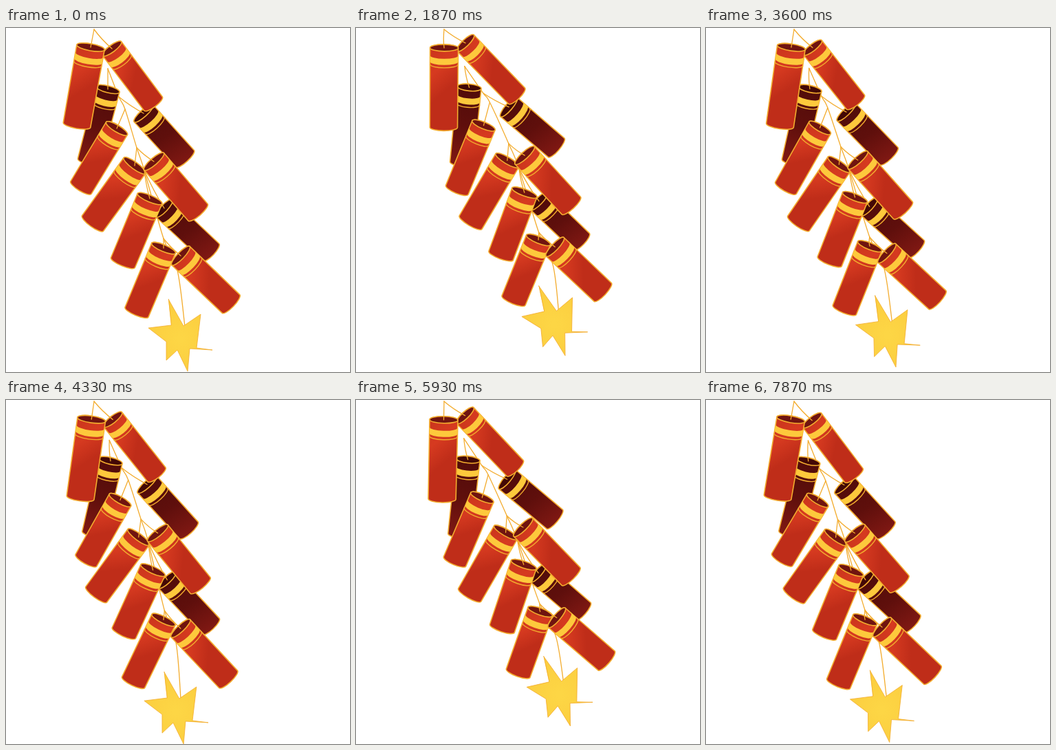
Animation, 500 px wide and 500 px high, one loop 7940 ms. Source, as an HTML page with a canvas:

```html
<!DOCTYPE html>
<html lang="en">
<head>
<meta charset="utf-8">
<title>Firecrackers</title>
<style>
  html, body { margin: 0; width: 100%; height: 100%; overflow: hidden; background: #fff; }
  canvas { display: block; width: 500px; height: 500px; }
</style>
</head>
<body>
<canvas id="stage"></canvas>
<script>
const canvas = document.getElementById('stage');
const ctx = canvas.getContext('2d');
const ratio = window.devicePixelRatio || 1;
canvas.width = canvas.height = 500 * ratio;

const GOLD = '#f3ac2e', BAND = '#fdc93c';
const LOOP = 7940, CYCLE = 57;

// Swing keys: [step, amount of right swing, amount of left swing]
const KEYS = [
  [0, 0, 0], [14, 0, 1], [23, 0.3, 1], [37, 1, 0],
  [40, 0.93, -0.19], [51, 0.13, 0.165], [55, 0.03, 0.04]
];

// Every place is given in three poses: rest, left swing, right swing
const NODES = [
  [[128, 2], [128, 2], [128, 2]],
  [[148, 59], [161, 55], [145, 59]],
  [[164, 100], [190, 93], [160, 101]],
  [[173, 118], [201, 107], [167, 117]],
  [[190, 174], [228, 168], [188, 172]],
  [[201, 207], [240, 205], [206, 205]],
  [[229, 306], [249, 302], [271, 294]],
  [[249, 352], [256, 355], [317, 332]],
  [[260, 434], [249, 433], [356, 395]]
];

// Back to front; each pose holds the top and bottom centres
const BARRELS = [
  { node: 1, w: 17.5, dark: true, poses: [[148, 89, 121, 194], [171, 86, 161, 197], [141, 89, 117, 193]] },
  { node: 2, w: 18.5, dark: true, poses: [[200, 124, 260, 190], [230, 115, 296, 181], [192, 121, 260, 172]] },
  { node: 5, w: 17.5, dark: true, poses: [[230, 262, 298, 326], [262, 256, 308, 333], [248, 251, 343, 280]] },
  { node: 0, w: 17, poses: [[154, 30, 214, 110], [161, 20, 242, 99], [152, 31, 204, 106]] },
  { node: 0, w: 20.5, poses: [[123, 28, 103, 141], [130, 29, 134, 146], [121, 28, 98, 139]] },
  { node: 3, w: 18, poses: [[161, 146, 109, 232], [191, 142, 155, 238], [158, 144, 105, 228]] },
  { node: 4, w: 19.5, poses: [[187, 200, 126, 284], [224, 194, 164, 278], [189, 195, 143, 292]] },
  { node: 4, w: 19, poses: [[215, 194, 279, 268], [250, 188, 307, 270], [215, 186, 300, 243]] },
  { node: 5, w: 19.3, poses: [[209, 248, 170, 341], [242, 241, 192, 327], [225, 242, 217, 345]] },
  { node: 6, w: 18.8, poses: [[229, 320, 190, 413], [243, 313, 185, 395], [281, 307, 284, 410]] },
  { node: 6, w: 18.8, poses: [[254, 331, 327, 401], [267, 330, 323, 415], [306, 305, 403, 338]] }
];

const STAR = [[253, 452, 0], [241.5, 448, -0.052], [351, 413.3, -0.122]];
const STAR_SHAPE = [
  [-17, -58], [5, -19], [30, -36], [24, 13], [47, 16], [14, 14],
  [11, 47], [-4, 16], [-20, 31], [-20, 4], [-46, -16], [-13, -20]
];

function keyAt(i) {
  const n = KEYS.length, turn = Math.floor(i / n);
  const [step, a, b] = KEYS[i - turn * n];
  return [step + turn * CYCLE, a, b];
}

function slope(i, c) {
  const p = keyAt(i - 1), k = keyAt(i), q = keyAt(i + 1);
  const h0 = k[0] - p[0], h1 = q[0] - k[0];
  return ((k[c] - p[c]) / h0 * h1 + (q[c] - k[c]) / h1 * h0) / (h0 + h1);
}

// Smooth periodic curve through the keys
function swing(step, c) {
  let i = 0;
  while (keyAt(i + 1)[0] <= step) i++;
  const k = keyAt(i), q = keyAt(i + 1), h = q[0] - k[0];
  const u = (step - k[0]) / h, v = 1 - u;
  return k[c] * v * v * (1 + 2 * u) + q[c] * u * u * (3 - 2 * u)
    + h * u * v * (slope(i, c) * v - slope(i + 1, c) * u);
}

function blend([rest, left, right], a, b) {
  return rest.map((v, i) => v + (right[i] - v) * a + (left[i] - v) * b);
}

function stroke(width) {
  ctx.strokeStyle = GOLD;
  ctx.lineWidth = width;
  ctx.stroke();
}

function drawCord(pts) {
  ctx.beginPath();
  ctx.moveTo(...pts[0]);
  for (let i = 0; i < pts.length - 1; i++) {
    const p = pts[i], q = pts[i + 1];
    const before = pts[i - 1] || p, after = pts[i + 2] || q;
    ctx.bezierCurveTo(
      p[0] + (q[0] - before[0]) / 6, p[1] + (q[1] - before[1]) / 6,
      q[0] - (after[0] - p[0]) / 6, q[1] - (after[1] - p[1]) / 6, q[0], q[1]);
  }
  stroke(1.3);
}

function bodyFill(w, len, dark) {
  const g = dark ? ctx.createLinearGradient(0, 0, -w, len) : ctx.createLinearGradient(-w, 0, w, len * 0.4);
  const stops = dark ? ['#520c0a', '#5f0f0c', '#7f1813'] : ['#c9351c', '#d63a20', '#bf2d19'];
  stops.forEach((color, i) => g.addColorStop(i / 2, color));
  return g;
}

function drawBarrel({ w, dark }, [tx, ty, bx, by]) {
  const len = Math.hypot(bx - tx, by - ty), low = w * 0.98, ry = 5;
  const dip = (y, back) => back
    ? ctx.ellipse(0, y, w, ry, 0, 0, Math.PI)
    : ctx.ellipse(0, y, w, ry, 0, Math.PI, 0, true);
  ctx.save();
  ctx.translate(tx, ty);
  ctx.rotate(Math.atan2(tx - bx, by - ty));

  ctx.beginPath();
  ctx.moveTo(-w, 0);
  ctx.ellipse(0, len, low, ry, 0, Math.PI, 0, true);
  ctx.ellipse(0, 0, w, ry, 0, 0, Math.PI, true);
  ctx.closePath();
  ctx.fillStyle = bodyFill(w, len, dark);
  ctx.fill();
  stroke(1.6);

  ctx.beginPath();
  dip(11, false);
  dip(20, true);
  ctx.closePath();
  ctx.fillStyle = BAND;
  ctx.fill();

  ctx.beginPath();
  dip(24, false);
  stroke(1.4);

  ctx.beginPath();
  ctx.ellipse(0, 0, w, ry, 0, 0, 2 * Math.PI);
  ctx.fillStyle = dark ? '#430806' : '#701410';
  ctx.fill();
  stroke(1.6);
  ctx.restore();
}

function drawBranch([nx, ny], [tx, ty]) {
  const bend = tx > nx ? 3 : 0;
  ctx.beginPath();
  ctx.moveTo(nx, ny);
  ctx.quadraticCurveTo((nx + tx) / 2 - bend / 2, (ny + ty) / 2 + bend / 2, tx, ty);
  stroke(1.3);
}

function drawStar([x, y, turn]) {
  ctx.save();
  ctx.translate(x, y);
  ctx.rotate(turn);
  ctx.beginPath();
  STAR_SHAPE.forEach(p => ctx.lineTo(...p));
  ctx.closePath();
  const g = ctx.createRadialGradient(0, 0, 4, 0, 0, 55);
  g.addColorStop(0, '#fdd645');
  g.addColorStop(1, '#fbcd3f');
  ctx.fillStyle = g;
  ctx.fill();
  stroke(0.8);
  ctx.restore();
}

function draw(step) {
  const a = swing(step, 1), b = swing(step, 2);
  const nodes = NODES.map(n => blend(n, a, b));
  ctx.setTransform(ratio, 0, 0, ratio, 0, 0);
  ctx.clearRect(0, 0, 500, 500);
  ctx.lineJoin = ctx.lineCap = 'round';
  drawCord(nodes.slice(1));
  for (const barrel of BARRELS) {
    const pose = blend(barrel.poses, a, b);
    drawBarrel(barrel, pose);
    drawBranch(nodes[barrel.node], pose);
  }
  drawStar(blend(STAR, a, b));
}

// 15 pictures a second, with one held twice in every 21
function tick() {
  const t = performance.now() % LOOP;
  const n = Math.min(118, Math.floor((t + 4) * 0.015));
  draw((n - Math.floor((n + 20) / 21)) % CYCLE);
  requestAnimationFrame(tick);
}
tick();
</script>
</body>
</html>
```
